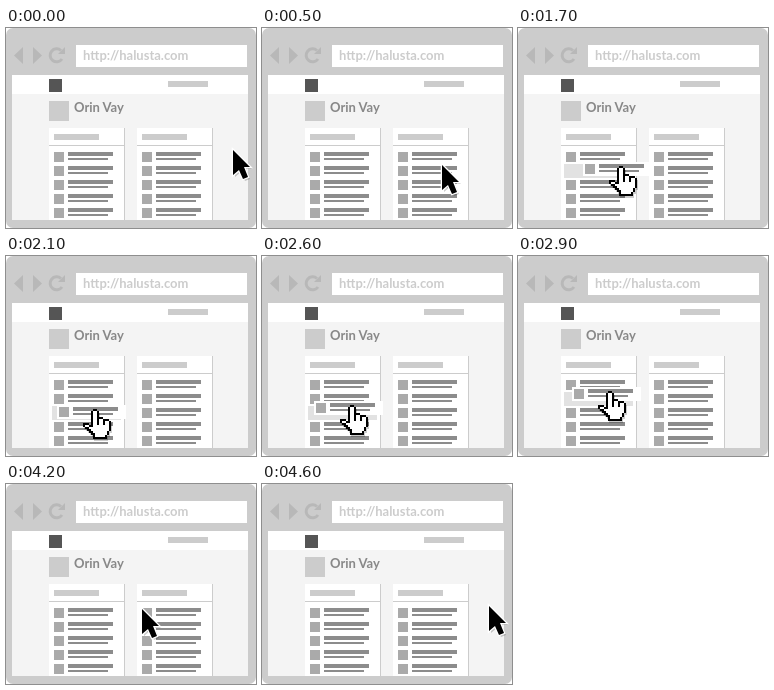
These frames come from a looping animation (250 by 200 pixels, 4.8 s). An HTML page:

```html
<!DOCTYPE html>
<html lang="en">
<head>
<meta charset="utf-8">
<title>Drag and drop between lists</title>
<style>
  html, body { margin: 0; width: 100%; height: 100%; overflow: hidden; background: #fff; }
  svg { display: block; width: 100vw; height: 100vh; }
  text { font: bold 13px Lato, sans-serif; }
</style>
</head>
<body>
<svg viewBox="0 0 250 200">
  <defs>
    <clipPath id="page"><rect x="6" y="47" width="236" height="145"/></clipPath>
    <g id="row" shape-rendering="crispEdges">
      <rect width="10" height="10" fill="#aaa"/>
      <rect x="14" width="45" height="4" fill="#8c8c8c"/>
      <rect x="14" y="6" width="40" height="2" fill="#8c8c8c"/>
    </g>
    <g id="column" shape-rendering="crispEdges">
      <rect width="76" height="100" fill="#ccc"/>
      <rect width="75" height="100" fill="#fff"/>
      <rect x="5" y="6" width="45" height="6" fill="#ccc"/>
      <rect y="17" width="75" height="1" fill="#ccc"/>
    </g>
    <path id="palm" d="M4 1H5V0H7V1H8V4H10V5H13V6H14V11H13V13H12V15H5V13H4V12H3V11H2V10H1V9H0V7H3V8H4Z"/>
    <path id="pointer" d="M0 0L17 17H11L15 27L10 29L6 20L0 25Z"/>
  </defs>

  <rect width="250" height="200" rx="7" fill="#ccc"/>
  <g fill="#b8b8b8">
    <path d="M8 27.5L17 19V36Z"/>
    <path d="M36 27.5L27 19V36Z"/>
    <path d="M56 31A6.5 6.5 0 1 1 55 22.5" fill="none" stroke="#b8b8b8" stroke-width="3"/>
    <path d="M59 19V26H52Z"/>
  </g>
  <rect x="70" y="17" width="171" height="22" fill="#fff"/>
  <text x="77" y="32" fill="#ccc">http://halusta.com</text>

  <g clip-path="url(#page)">
    <rect x="6" y="47" width="236" height="145" fill="#f4f4f4"/>
    <rect x="6" y="47" width="236" height="19" fill="#fff"/>
    <rect x="43" y="51" width="13" height="13" fill="#555"/>
    <rect x="162" y="53" width="40" height="6" fill="#ccc"/>
    <rect x="43" y="73" width="20" height="20" fill="#ccc"/>
    <text x="68" y="84" fill="#888">Orin Vay</text>
    <use href="#column" x="43" y="100"/>
    <use href="#column" x="131" y="100"/>
    <g id="rows"></g>
    <rect id="gap" width="69" height="14" fill="#e2e2e2"/>
    <g id="card">
      <rect x="-2" y="-2" width="69" height="14" fill="#fff"/>
      <use href="#row"/>
    </g>
  </g>

  <g id="arrow">
    <use href="#pointer" x="2" y="2" opacity=".2"/>
    <use href="#pointer" stroke="#fff" stroke-width="2.5"/>
    <use href="#pointer"/>
  </g>
  <g id="hand">
    <g transform="scale(2)" shape-rendering="crispEdges">
      <use href="#palm" x=".5" y="1" opacity=".2"/>
      <use href="#palm"/>
      <path fill="#fff" d="M5 1H7V5H10V6H13V11H12V13H11V14H6V12H5V11H4V10H3V9H1V8H3V9H5Z"/>
      <path d="M7 5h1v3h-1zM10 6h1v2h-1z"/>
    </g>
  </g>
</svg>

<script>
const LOOP = 4800, STEP = 100, PITCH = 14, TOP = 124, LEFT = 48, RIGHT = 136;
const $ = id => document.getElementById(id);
const [rowsLayer, gap, card, arrow, hand] = ['rows', 'gap', 'card', 'arrow', 'hand'].map($);

const rows = [LEFT, RIGHT].flatMap(x => [0, 1, 2, 3, 4].map(slot => {
  const el = document.createElementNS('http://www.w3.org/2000/svg', 'use');
  el.setAttribute('href', '#row');
  el.setAttribute('x', x);
  el.setAttribute('y', TOP + slot * PITCH);
  rowsLayer.append(el);
  return { el, x, slot };
}));

const show = (el, on) => { el.style.display = on ? '' : 'none'; };
const place = (el, x, y) => el.setAttribute('transform', `translate(${Math.round(x)} ${Math.round(y)})`);
const mix = (a, b, p) => a + (b - a) * p;

// Stepped progress: the first step lands at the start time
const progress = (t, start, steps) =>
  Math.max(0, Math.min(steps, Math.floor((t - start) / STEP) + 1)) / steps;

// Position of the dragged row: across, down, then up to the top
function dragPosition(t) {
  const across = progress(t, 1200, 6), down = progress(t, 1800, 4), up = progress(t, 2600, 6);
  if (up) return [mix(53, 58, up), mix(151, TOP, up)];
  if (down) return [mix(67, 53, down), mix(136, 151, down)];
  return [mix(RIGHT, 67, across), mix(138, 136, across) - 2 * Math.sin(Math.PI * across)];
}

function draw(t) {
  const [x, y] = dragPosition(t);
  const dragging = t >= 1200 && t < 3600;
  const column = x < 100 ? LEFT : RIGHT;
  const slot = Math.round((y - TOP) / PITCH);

  for (const row of rows) show(row.el, !(dragging && row.x === column && row.slot === slot));
  show(gap, dragging);
  show(card, dragging);
  place(gap, column - 2, TOP - 2 + slot * PITCH);
  place(card, x, y);

  const holding = t >= 600 && t < 4100;
  show(hand, holding);
  show(arrow, !holding);
  place(hand, x + 24, y + 2);
  const enter = progress(t, 100, 6), leave = progress(t, 4100, 6);
  if (leave) place(arrow, mix(91, 227, leave), mix(126, 122, leave));
  else place(arrow, mix(227, 170, enter), mix(122, 140, enter));
}

function tick() {
  draw(performance.now() % LOOP);
  requestAnimationFrame(tick);
}
tick();
</script>
</body>
</html>
```
